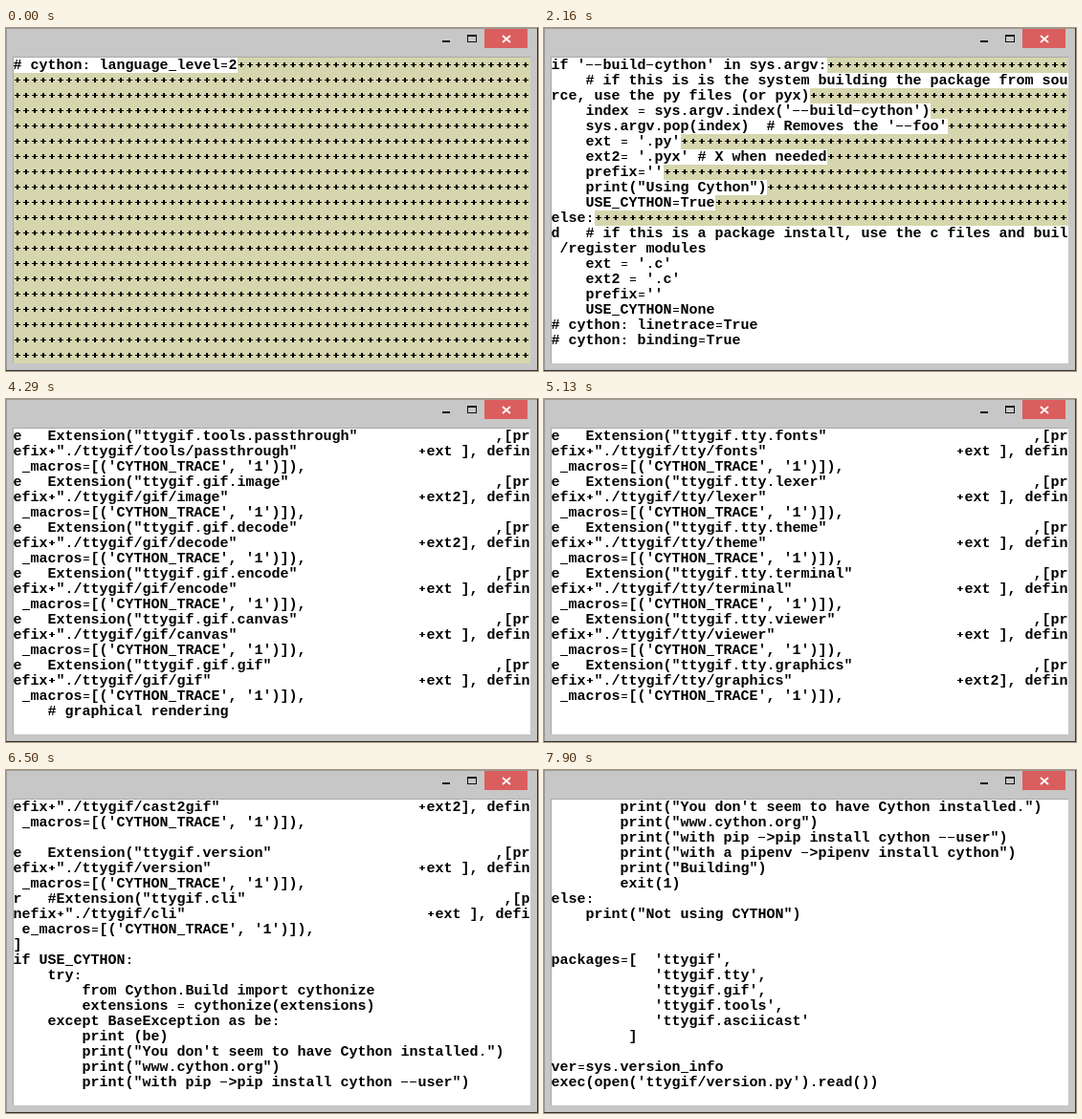
These frames come from a looping animation (556x359 px, 8 s). An HTML page with a canvas:

```html
<!DOCTYPE html>
<html lang="en">
<head>
<meta charset="utf-8">
<title>Terminal</title>
<style>
  html, body { margin: 0; width: 100%; height: 100%; overflow: hidden; background: #c7c7c7; }
  canvas { display: block; }
</style>
</head>
<body>
<canvas id="stage" width="556" height="359"></canvas>
<script>
const COLS = 60, ROWS = 20, CELL_W = 9, CELL_H = 16, LEFT = 8, TOP = 31;
const LOOP = 8000, STEP = 100;
const ctx = document.getElementById('stage').getContext('2d');

const HASH = '\x23';
const pkg = 'ttygif';
const note = (text, indent = '    ', gap = ' ') => indent + HASH + gap + text;
const extension = (name, ext = '+ext ]', mark = '') =>
  '    ' + mark +
  `Extension("${pkg}.${name}"`.padEnd(52) +
  `,[prefix+"./${pkg}/${name.replace('.', '/')}"`.padEnd(51) +
  `${ext}, define_macros=[('CYTHON_TRACE', '1')]),`;
const extensions = (group, names) =>
  names.split(' ').map(name => extension(group + '.' + name));

// Each entry is a line, or a line with how long it stays the last one (ms).
const script = [
  [note('cython: language_level=2', ''), 40],
  'import os',
  'import sys',
  ['from setuptools import setup, find_packages', 20],
  'from setuptools.extension import Extension',
  'from Cython.Build import cythonize',
  '',
  '',
  `if '--build-cython' in sys.argv:`,
  note('if this is is the system building the package from source, use the py files (or pyx)'),
  `    index = sys.argv.index('--build-cython')`,
  `    sys.argv.pop(index)` + note(`Removes the '--foo'`, '  '),
  [`    ext = '.py'`, 0],
  `    ext2= '.pyx'` + note('X when needed', ' '),
  `    prefix=''`,
  `    print("Using Cython")`,
  '    USE_CYTHON=True',
  'else:',
  note('if this is a package install, use the c files and build/register modules'),
  `    ext = '.c'`,
  `    ext2 = '.c'`,
  `    prefix=''`,
  '    USE_CYTHON=None',
  note('cython: linetrace=True', ''),
  note('cython: binding=True', ''),
  note('distutils: define_macros=CYTHON_TRACE_NOGIL=1', ''),
  '',
  'extensions = [',
  note('data import', '    ', ''),
  extension('asciicast.reader'),
  note('gif minipulation', '    ', ''),
  extension('gif.application_extension'),
  [extension('gif.color_table'), 30],
  ...extensions('gif', 'comment_extension graphics_control_extension header image_descriptor'),
  ...extensions('gif', 'logical_screen_descriptor plain_text_extension trailer'),
  extension('tools.passthrough'),
  extension('gif.image', '+ext2]'),
  extension('gif.decode', '+ext2]'),
  ...extensions('gif', 'encode canvas gif'),
  note('graphical rendering'),
  ...extensions('tty', 'ansi cursor events'),
  [extension('tty.fonts'), 20],
  [extension('tty.lexer'), 20],
  ...extensions('tty', 'theme terminal viewer'),
  extension('tty.graphics', '+ext2]'),
  '',
  note('gif orchestraton of frames and data'),
  extension('cast2gif', '+ext2]'),
  ['', 30],
  extension('version'),
  extension('cli', '+ext ]', HASH),
  ']',
  'if USE_CYTHON:',
  ['    try:', 40],
  '        from Cython.Build import cythonize',
  '        extensions = cythonize(extensions)',
  '    except BaseException as be:',
  '        print (be)',
  `        print("You don't seem to have Cython installed.")`,
  `        print("www.cython.org")`,
  `        print("with pip ->pip install cython --user")`,
  `        print("with a pipenv ->pipenv install cython")`,
  `        print("Building")`,
  '        exit(1)',
  'else:',
  `    print("Not using CYTHON")`,
  '',
  ['', 0],
  `packages=[  '${pkg}',`,
  ...['tty', 'gif', 'tools'].map(name => `            '${pkg}.${name}',`),
  `            '${pkg}.asciicast'`,
  '         ]',
  ['', 0],
  'ver=sys.version_info',
  `exec(open('${pkg}/version.py').read())`,
];

let clock = 0;
const lines = script.map(entry => {
  const [text, ms] = Array.isArray(entry) ? entry : [entry, STEP];
  const start = clock;
  clock += ms;
  return { text, start };
});

// Cells start as null (never written); scrolled-in rows are blank.
function runTerminal(count) {
  const grid = Array.from({ length: ROWS }, () => Array(COLS).fill(null));
  let row = 0;
  const newline = () => {
    if (row < ROWS - 1) { row++; return; }
    grid.shift();
    grid.push(Array(COLS).fill(' '));
  };
  for (const { text } of lines.slice(0, count)) {
    let col = 0;
    for (const char of text) {
      if (col === COLS) {
        // On the bottom row the wrapped character lands before the scroll.
        const bottom = row === ROWS - 1;
        if (bottom) grid[row][0] = char;
        newline();
        col = bottom ? 1 : 0;
        if (bottom) continue;
      }
      grid[row][col++] = char;
    }
    newline();
  }
  return grid;
}

const rect = (color, x, y, w, h) => {
  ctx.fillStyle = color;
  ctx.fillRect(x, y, w, h);
};

// Simple signs as boxes inside a cell: x, y, width, height.
const signs = {
  '+': [[1, 7, 6, 1], [3, 5, 2, 5]],
  '-': [[0, 7, 7, 1]],
  '=': [[1, 6, 6, 1], [1, 9, 6, 1]],
  '_': [[0, 13, 8, 1]],
  '.': [[3, 10, 2, 2]],
  ':': [[3, 5, 2, 2], [3, 10, 2, 2]],
};

function drawCell(char, col, row) {
  const x = LEFT + col * CELL_W, y = TOP + row * CELL_H;
  rect(char === null ? '#d6d6ae' : '#fff', x, y, CELL_W, CELL_H);
  const glyph = char ?? '+';
  if (signs[glyph]) {
    for (const [dx, dy, w, h] of signs[glyph]) rect('#000', x + dx, y + dy, w, h);
  } else if (glyph !== ' ') {
    ctx.fillStyle = '#000';
    ctx.fillText(glyph, x - 0.5, y + 12);
  }
}

function drawWindow() {
  rect('#c7c7c7', 0, 0, 556, 359);
  rect('#999', 0, 0, 556, 1);
  rect('#999', 0, 0, 1, 359);
  rect('#333', 555, 0, 1, 359);
  rect('#333', 0, 358, 556, 1);
  rect('#aaa', 7, 30, 541, 1);
  rect('#aaa', 7, 30, 1, 321);
  rect('#111', 456, 13, 8, 2);
  rect('#111', 482, 7, 10, 8);
  rect('#c7c7c7', 483, 9, 8, 5);
  rect('#db5e5e', 500, 1, 45, 20);
  ctx.strokeStyle = '#fff';
  ctx.lineWidth = 1.8;
  ctx.beginPath();
  ctx.moveTo(519, 8); ctx.lineTo(527, 15);
  ctx.moveTo(527, 8); ctx.lineTo(519, 15);
  ctx.stroke();
}

function draw(count) {
  drawWindow();
  ctx.font = 'bold 15px "Liberation Mono", monospace';
  runTerminal(count).forEach((cells, row) =>
    cells.forEach((char, col) => drawCell(char, col, row)));
}

let began = null, shown = 1;
function tick(now) {
  began ??= now;
  const time = (now - began) % LOOP;
  const count = lines.filter(line => line.start <= time).length;
  if (count !== shown) draw(shown = count);
  requestAnimationFrame(tick);
}
draw(shown);
requestAnimationFrame(tick);
</script>
</body>
</html>
```
